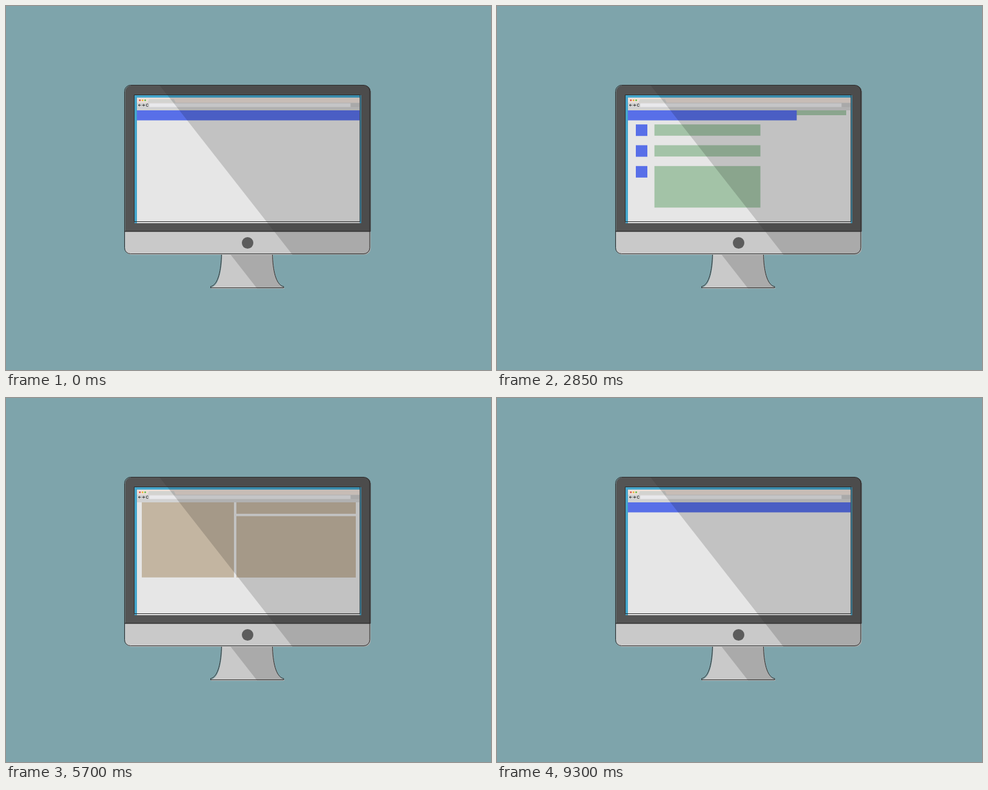
An HTML page with a canvas that plays this animation: 800x600 px, repeating every 9330 ms.

```html
<!DOCTYPE html>
<html lang="en">
<head>
<meta charset="utf-8">
<title>Web pages on a desktop monitor</title>
<style>
html, body { margin: 0; height: 100%; overflow: hidden; background: #7ea4ab; }
canvas { display: block; }
</style>
</head>
<body>
<canvas id="stage" width="800" height="600"></canvas>
<script>
const ctx = document.getElementById('stage').getContext('2d');
const LOOP = 9330;
const BLUE = '#586fe8', GREEN = '#a3c3a7', TAN = '#c3b5a1', BROWN = '#b2a18c';
const YELLOW = '#ffd284', GRAY = '#929292', INK = '#2b2b2b';
let now = 0;

const progress = (start, length) => Math.min(1, Math.max(0, (now - start) / length));
const enter = (start, length) => {
  const u = progress(start, length) - 1;
  return 1 + 2.3 * u ** 3 + 1.3 * u ** 2;
};
const leave = (start, length) => 1 - progress(start, length) ** 2;
const glide = (start, length) => {
  const p = progress(start, length);
  return p * p * (3 - 2 * p);
};

function rect(x, y, w, h, color) {
  ctx.fillStyle = color;
  ctx.fillRect(x, y, w, h);
}
function disc(x, y, r, color) {
  ctx.fillStyle = color;
  ctx.beginPath();
  ctx.arc(x, y, Math.max(0, r), 0, 7);
  ctx.fill();
}
function square(x, y, size, scale, color) {
  const s = size * scale;
  rect(x + (size - s) / 2, y + (size - s) / 2, s, s, color);
}
function line(path, color = INK, width = 1) {
  ctx.strokeStyle = color;
  ctx.lineWidth = width;
  ctx.stroke(path);
}
function rounded(x, y, w, h, radii) {
  const path = new Path2D();
  path.roundRect(x, y, w, h, radii);
  return path;
}
function clipped(path, draw) {
  ctx.save();
  ctx.clip(path);
  draw();
  ctx.restore();
}

const body = rounded(196.5, 131, 405, 279, 10);
const outline = rounded(195.5, 130.5, 404.5, 278, 10);
const page = rounded(216, 172, 367.5, 186, 0);
const stand = new Path2D('M355.5 408.5C355 435 350 460 337.5 462.5V464.5H458V462.5C445 460 440 435 439.5 408.5Z');
const bodyShade = new Path2D('M253 130L472.5 410H603V130Z');
const standShade = new Path2D('M369 408L414 465.5H460V408Z');
const arrows = new Path2D('M222.5 163.5H218.5M220.5 161.5L218.5 163.5L220.5 165.5M224.5 163.5H228.5M226.5 161.5L228.5 163.5L226.5 165.5M234.7 162.3A2 2 0 1 0 234.7 164.7');

function profilePage() {
  const up = 92.5 * glide(1500, 400);
  const left = 88 * glide(2150, 380);
  rect(224, 188 - up, 352, 84.5 * enter(80, 500), GREEN);
  square(241, 239.5 - up, 38.5, enter(550, 400), BLUE);
  rect(224, 288 - up, 76 * leave(2000, 280), 137 * enter(950, 500), GREEN);

  for (let i = 0; i < 3; i++) {
    const y = 287.7 + 34.3 * i - up;
    const start = [1000, 1242, 1950][i];
    const out = leave(2870 + 50 * i, 250);
    const grown = enter(start, 400);
    square(317 - left, y, 19, enter(start - 120, 350) * out, BLUE);
    if (i < 2) rect(347.7 - left, y, 174.8 * grown * out, 18.6, GREEN);
    else rect(347.7 - left, y, 174.8 * out, 68.5 * grown, GREEN);
  }
}

function galleryPage() {
  const up = 130 * glide(4750, 600) + 0.00185 * Math.max(0, now - 5603) ** 2;
  rect(217, 172.5 - up, 367 * enter(3020, 400), 53.3, TAN);
  disc(400, 199.3 - up, 17.8 * enter(3250, 350), BROWN);
  for (let i = 0; i < 3; i++)
    rect(335.5 + 45.6 * i, 230 - up, 38 * enter(3350 + 100 * i, 350), 7.5, BROWN);
  rect(380, 241.3 - up, 197, 97.3 * enter(3550, 450), TAN);
  rect(224, 241.3 - up, 152, 202.2 * enter(4119, 600), TAN);
  rect(380, 342.5 - up, 197, 101.2 * enter(4500, 450), TAN);
}

function shopPage() {
  for (let row = 0; row < 2; row++) {
    const y = 183.7 + 90.1 * row;
    const start = 6030 + 930 * row;
    const end = 8353 + 90 * row;
    rect(228, y, 113.5 * leave(end + 120, 260), 71.8 * enter(start, 480), YELLOW);
    for (let i = 0; i < 4; i++)
      rect(352, y + 9.4 * i, 113.5 * enter(start + 320 + 90 * i, 360) * leave(end + 60 + 30 * i, 260), 6.5, GRAY);
    rect(352, y + 60.2, 60.5 * enter(start + 640, 300) * leave(end, 300), 11.5, YELLOW);
  }
}

function browser() {
  rect(212, 147, 374, 211, '#45a6cc');
  rect(216, 151, 367.5, 207, '#e6e6e6');
  rect(216, 151.5, 367.5, 8.5, '#ecdfd8');
  ctx.fillStyle = '#d3d3d0';
  ctx.fill(new Path2D('M233 159.5L236 153.5H277L280 159.5Z'));
  rect(216, 159.5, 367.5, 12.5, '#d2d2d2');
  rect(236.5, 160.5, 332, 6, '#e9e9ec');
  rect(568.5, 160, 15, 6.5, '#c8c8c8');
  ['#e0483e', '#f0b429', '#62ba46'].forEach((color, i) => disc(220.8 + 4.4 * i, 155.4, 1.4, color));
  line(arrows, '#333');

  clipped(page, () => {
    if (now < 3400) profilePage();
    if (now > 2900 && now < 6000) galleryPage();
    if (now >= 6000) shopPage();
    const bar = now < 4500 ? leave(2700, 306) : enter(8700, 590);
    rect(216, 172, 368 * bar, 16.5, BLUE);
  });
}

function monitor() {
  ctx.save();
  ctx.translate(1, 1.5);
  ctx.fillStyle = '#c9c9c9';
  ctx.fill(stand);
  clipped(stand, () => {
    ctx.fillStyle = 'rgba(0,0,0,.157)';
    ctx.translate(-1, -1.5);
    ctx.fill(standShade);
  });
  ctx.restore();
  line(stand);

  clipped(body, () => {
    rect(195, 130, 408, 242, '#545454');
    rect(195, 372, 408, 40, '#c9c9c9');
    browser();
    ctx.fillStyle = 'rgba(0,0,0,.157)';
    ctx.fill(bodyShade);
    // The dark bezel takes a lighter shade than the rest.
    ctx.fillStyle = '#4c4c4c';
    const bezel = new Path2D('M195 130H603V371H195ZM212 147V358H586V147Z');
    clipped(bezel, () => ctx.fill(bodyShade));
  });
  disc(398.5, 390.5, 9.5, '#5c5c5c');
  line(outline);
  line(new Path2D('M195.5 371.5H601'), '#333', 1.5);
  line(rounded(211.5, 146.5, 372.5, 209, 0));
}

function frame(time) {
  now = time % LOOP;
  rect(0, 0, 800, 600, '#7ea4ab');
  monitor();
  requestAnimationFrame(() => frame(performance.now()));
}
frame(0);
</script>
</body>
</html>
```
